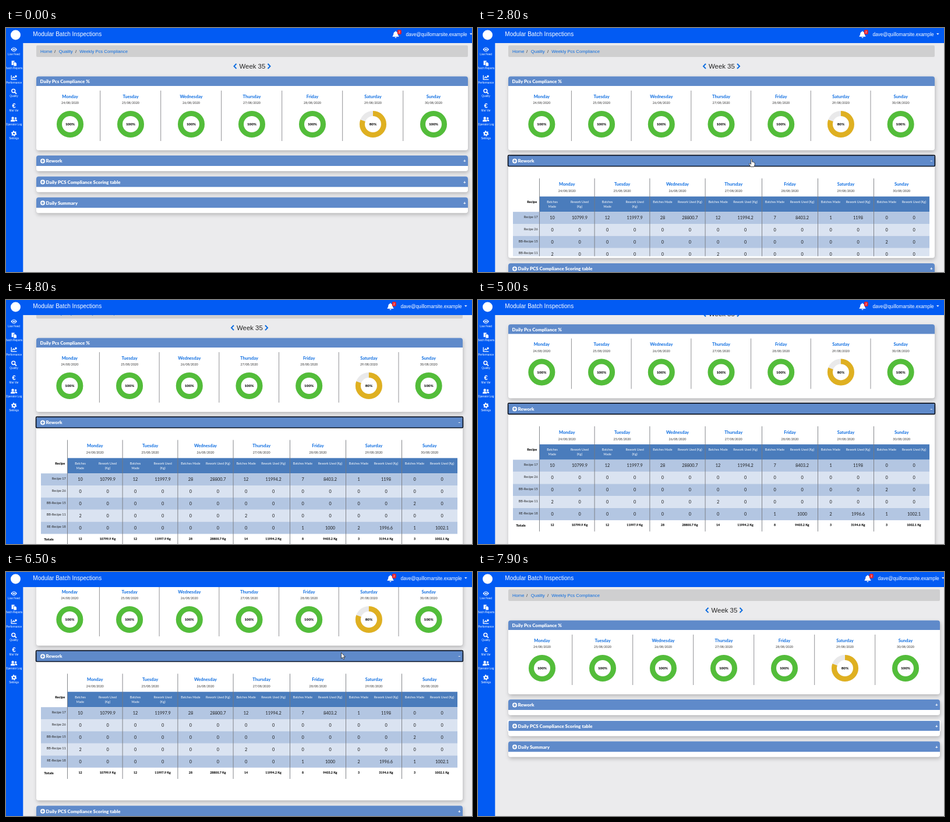
These frames come from a looping animation (800 px wide and 421 px high, 8 s). An HTML page:

```html
<!DOCTYPE html>
<html lang="en">
<head>
<meta charset="utf-8">
<title>Weekly compliance</title>
<style>
  html, body { margin: 0; width: 100%; height: 100%; overflow: hidden; background: #ebebed; }
  svg { display: block; width: 100vw; height: 100vh; }
  .arial { font-family: "Liberation Sans", Arial, sans-serif; }
  .lato { font-family: Lato, sans-serif; }
  .shade { filter: drop-shadow(1px 3px 3px rgba(0, 0, 0, .22)); }
</style>
</head>
<body>
<svg viewBox="0 0 800 421" preserveAspectRatio="none">
  <rect width="800" height="421" fill="#ebebed"/>
  <g id="page"></g>
  <rect width="800" height="26" fill="#025bf3"/>
  <rect width="29.3" height="421" fill="#025bf3"/>
  <circle cx="16.5" cy="12" r="8.5" fill="#fff"/>
  <text class="arial" x="46.3" y="14.3" font-size="10" fill="#fff">Modular Batch Inspections</text>
  <g id="account">
    <path d="M663.6 14.2Q665.3 12.8 665.3 10Q665.5 6.8 668.4 6.3V5.3H669.6V6.3Q672.5 6.8 672.7 10Q672.7 12.8 674.4 14.2V15H663.6ZM667.4 15.7H670.6Q670.4 17.2 669 17.2Q667.6 17.2 667.4 15.7Z" fill="#fff"/>
    <rect x="671.8" y="3" width="7" height="8" rx="2" fill="#e3202d"/>
    <text class="arial" x="675.3" y="9" font-size="5.5" fill="#fff" text-anchor="middle">2</text>
    <text class="arial" x="686.5" y="13.6" font-size="8.18" fill="#fff">dave@quillomarsite.example</text>
    <path d="M796 9.3H800.6L798.3 11.8Z" fill="#fff"/>
  </g>
  <g id="side"></g>
  <g id="cursor" stroke="#222" stroke-width=".8" stroke-linejoin="round" fill="#fff">
    <path id="arrow" d="M0 0V10.2L2.3 8.2L3.8 11.8L5.4 11.1L3.9 7.6H7Z"/>
    <path id="hand" d="M-1 1Q0-.8 1 1V5L2.7 5.2L4.2 5.8L5.6 6.8V10L4.4 13.4H-1.4L-3.8 9.4Q-4.6 7.4-3 7.6L-1 9.2Z"/>
  </g>
</svg>
<script>
const LOOP = 8000, STEP = 100, GROW = 231, LEFT = 52;
const BLUE = '#5f8aca', LINK = '#0a6be0', WHITE = '#fff';
const days = ['Monday', 'Tuesday', 'Wednesday', 'Thursday', 'Friday', 'Saturday', 'Sunday'];
const dayX = [0, 94.6, 189.4, 284.6, 382, 478, 574, 669.5];
// Non-zero cells only: column index -> value (two columns per day).
const recipes = [
  ['Recipe 17', {0: 10, 1: 10799.9, 2: 12, 3: 11997.9, 4: 28, 5: 28800.7, 6: 12, 7: 11994.2, 8: 7, 9: 8403.2, 10: 1, 11: 1198}],
  ['Recipe 26', {}],
  ['BB-Recipe 15', {12: 2}],
  ['BB-Recipe 11', {0: 2, 6: 2}],
  ['RE-Recipe 18', {8: 1, 9: 1000, 10: 2, 11: 1996.6, 12: 1, 13: 1002.1}]
];
const totals = [12, '10799.9 Kg', 12, '11997.9 Kg', 28, '28800.7 Kg', 14, '11994.2 Kg', 8, '9403.2 Kg', 3, '3194.6 Kg', 3, '1002.1 Kg'];

// time, x, y of the pointer tip
const pointer = [
  [900, 802, 150], [1700, 470, 226], [3000, 469.5, 226], [3300, 504.5, 234],
  [3500, 504.5, 234], [3700, 600, 245], [4000, 600, 245], [4200, 720, 256],
  [4500, 805, 262], [5600, 805, 190], [6200, 580, 148], [6400, 580, 148],
  [6500, 575.5, 139], [7200, 575.5, 139], [7500, 573, 261]
];
const scrolling = [[4700, 0], [4800, 18], [5300, 77], [5600, 84]];

const el = id => document.getElementById(id);
const ease = u => { u = Math.min(1, Math.max(0, u)); return u * u * (3 - 2 * u); };

function track(keys, t, k = 1) {
  if (t <= keys[0][0]) return keys[0][k];
  for (let i = 1; i < keys.length; i++) {
    const a = keys[i - 1], b = keys[i];
    if (t <= b[0]) return a[k] + (b[k] - a[k]) * (t - a[0]) / (b[0] - a[0]);
  }
  return keys[keys.length - 1][k];
}

const rect = (x, y, w, h, fill, more = '') =>
  `<rect x="${x}" y="${y}" width="${w}" height="${h}" fill="${fill}" ${more}/>`;
const line = (x, y1, y2, color) =>
  `<path d="M${x} ${y1}V${y2}" stroke="${color}" stroke-width=".9"/>`;
const text = (s, x, y, size, fill, weight = 400, anchor = 'middle', font = 'lato') =>
  `<text class="${font}" x="${x}" y="${y}" font-size="${size}" fill="${fill}" font-weight="${weight}" text-anchor="${anchor}">${s}</text>`;
const date = i => `${24 + i}/08/2020`;

function card(y, head, body, right) {
  const w = right - LEFT, r = 4;
  return rect(LEFT, y, w, head + body, WHITE, `rx="${r}" class="shade"`) +
    `<path d="M${LEFT} ${y + head}v${r - head}q0-${r} ${r}-${r}h${w - 2 * r}q${r} 0 ${r} ${r}v${head - r}z" fill="${BLUE}"/>`;
}

function fold(title, y, body, right, sign) {
  return card(y, 18, body, right) +
    `<circle cx="63" cy="${y + 9.5}" r="4" fill="#fff"/>` +
    `<path d="M60.6 ${y + 9.5}h4.8m-2.4-2.4v4.8" stroke="${BLUE}" stroke-width="1.3"/>` +
    text(title, 68.6, y + 12.4, 8, WHITE, 900, 'start') +
    text(sign, right - 5.8, y + 12.3, 8, WHITE, 900);
}

function ring(y, right, color) {
  return rect(LEFT - .4, y - .3, right - LEFT + .8, 18.8, 'none', `rx="1.5" stroke="${color}" stroke-width="1.7"`);
}

function donut(x, y, share) {
  const r = 18.5, len = 2 * Math.PI * r, color = share < 1 ? '#dfb021' : '#53bd3a';
  const circle = (c, dash) => `<circle cx="${x}" cy="${y}" r="${r}" fill="none" stroke="${c}" stroke-width="9" ${dash}/>`;
  return circle('#e9e9ea', '') +
    circle(color, `stroke-dasharray="${len * share} ${len}" transform="rotate(-90 ${x} ${y})"`) +
    text(share * 100 + '%', x, y + 2.3, 6.3, '#111', 900);
}

function summary(right) {
  const pitch = (right - LEFT - 13) / 7;
  let s = rect(LEFT, 30, right - LEFT, 20, '#cfcfd0', 'rx="2"');
  [['Home', 59], ['Quality', 90.7], ['Weekly Pcs Compliance', 126.2]].forEach(([name, x]) => {
    s += text(name, x, 43, 7.7, LINK, 400, 'start', 'arial');
  });
  s += text('/', 84, 43, 7.7, '#333', 400, 'middle', 'arial') + text('/', 120, 43, 7.7, '#333', 400, 'middle', 'arial');
  const mid = (LEFT + right) / 2;
  s += text('Week 35', mid + .4, 70, 11.4, '#222', 400, 'middle', 'arial');
  s += `<path d="M${mid - 27} 61.7l-4 4.2l4 4.2M${mid + 27} 61.7l4 4.2l-4 4.2" fill="none" stroke="${LINK}" stroke-width="2"/>`;
  s += card(83.5, 16.5, 111, right) + text('Daily Pcs Compliance %', 58.6, 95.2, 8, WHITE, 900, 'start');
  days.forEach((day, i) => {
    const x = 58 + pitch * (i + .5);
    if (i) s += line(57.7 + pitch * i, 108, 195, '#85858a');
    s += text(day, x, 120.6, 7.5, LINK, 700) + text(date(i), x, 131.3, 5.4, '#333') +
      donut(x, 166, day === 'Saturday' ? .8 : 1);
  });
  return s;
}

function table(right) {
  const end = right - 9, k = (end - 105.5) / dayX[7], rowH = 20.85;
  const at = i => 105.5 + dayX[i] * k;
  const cell = c => at(c >> 1) + (c % 2 ? 69 : 22) * k;
  let s = rect(105.5, 290.7, end - 105.5, 26.5, '#4a7cbc') + text('Recipe', 101.2, 302, 5.6, '#111', 900, 'end');
  recipes.forEach(([name, values], r) => {
    const y = 317.2 + r * rowH;
    s += rect(60, y, end - 60, rowH + .1, r % 2 ? '#dae3f1' : '#b3c6e2') + text(name, 102.7, y + 10.6, 5.5, '#222', 400, 'end');
    for (let c = 0; c < 14; c++) s += text(values[c] || 0, cell(c), y + 12.9, 7.3, '#1c1c1c');
  });
  s += text('Totals', 65.3, 433, 6.2, '#111', 900, 'start');
  totals.forEach((v, c) => { s += text(v, cell(c), 432, 5.3, '#111', 900); });
  days.forEach((day, i) => {
    const mid = (at(i) + at(i + 1)) / 2, a = cell(2 * i), b = cell(2 * i + 1);
    s += line(at(i), 259.5, 441, '#77797e') + text(day, mid, 272.4, 7.5, LINK, 700) + text(date(i), mid, 283.3, 5.4, '#333');
    const heads = i < 2
      ? [['Batches', a, 301.7], ['Made', a, 309.7], ['Rework Used', b, 301.7], ['(Kg)', b, 309.7]]
      : [['Batches Made', a, 301.7], ['Rework Used (Kg)', b, 301.7]];
    heads.forEach(([label, x, y]) => { s += text(label, x, y, 5.35, WHITE); });
  });
  return s;
}

function page(open, right, t) {
  const grow = GROW * open;
  let s = summary(right) + fold('Rework', 220, 9 + grow, right, t >= 2500 && t < 6700 ? '–' : '+');
  if (open > 0) {
    s += `<clipPath id="body"><rect x="${LEFT}" y="238" width="${right - LEFT}" height="${6 + grow}"/></clipPath>` +
      `<g clip-path="url(#body)">${table(right)}</g>`;
  }
  s += fold('Daily PCS Compliance Scoring table', 256.3 + grow, 9, right, '+');
  s += fold('Daily Summary', 292.3 + grow, 9, right, '+');
  if (t >= 2500 && t < 7600) s += ring(220, right, '#0b1220');
  if (t >= 7600) s += ring(256.3, right, WHITE);
  return s;
}

function sidebar() {
  const icons = [
    ['Live Feed', 37, '<path d="M-5.2 0Q0-7.4 5.2 0Q0 7.4-5.2 0Z"/><circle r="2.7" fill="#025bf3"/><circle r="1.5"/>'],
    ['Batch Reports', 61, '<path d="M-4-4.5H1V-2.5H-1V3H-4Z"/><path d="M-.3-1.8H2.6L4.4 0V4.6H-.3Z"/>'],
    ['Performance', 85.5, '<path d="M-4.4-4V3.4H4.8M-2.6 1L-.6-1.4L1 .4L4-2.8M1.8-3H4.2V-.6" fill="none" stroke="#fff" stroke-width="1.3"/>'],
    ['Quality', 109.3, '<path d="M1.6 1.6L4.4 4.4" stroke="#fff" stroke-width="1.9"/><circle cx="-.8" cy="-.8" r="2.9" fill="none" stroke="#fff" stroke-width="1.5"/>'],
    ['Mat Var', 133.7, text('€', 0, 3.9, 11, WHITE, 700, 'middle', 'arial')],
    ['Operator Log', 157.5, '<circle cx="-2" cy="-2" r="2.2"/><path d="M-5.6 4V2.6Q-5.4 .6-3.4 .6H-.6Q1.4 .6 1.6 2.6V4Z"/><circle cx="3" cy="-1.7" r="1.7"/><path d="M2 .6H4Q5.6 .8 5.8 3.3H2.4Q2.3 1.5 1.4 .8Z"/>'],
    ['Settings', 182, '<circle r="2.6" fill="none" stroke="#fff" stroke-width="2"/><circle r="4" fill="none" stroke="#fff" stroke-width="1.5" stroke-dasharray="2.1 2.09"/>']
  ];
  el('side').innerHTML = icons.map(([label, y, shape]) =>
    `<g transform="translate(13.6 ${y})" fill="#fff">${shape}</g>` +
    text(label, 13.6, y + 10, 4.7, WHITE, 400, 'middle', 'arial')).join('');
}

function draw(t) {
  const open = ease((t - 2500) / 500) - ease((t - 6700) / 500);
  const spare = GROW * open - 86;
  const right = spare > 0 ? 784 : 793;
  const scroll = Math.max(0, Math.min(track(scrolling, t), spare));
  el('page').innerHTML = page(open, right, t);
  el('page').setAttribute('transform', `translate(0 ${-scroll})`);
  el('account').setAttribute('transform', `translate(${right - 793} 0)`);
  const shown = t >= 900 && t < 7600;
  const hand = t >= 1600 && t <= 3500 || t >= 6600;
  el('cursor').setAttribute('transform', `translate(${track(pointer, t, 1)} ${track(pointer, t, 2)})`);
  el('arrow').style.display = shown && !hand ? '' : 'none';
  el('hand').style.display = shown && hand ? '' : 'none';
}

let last = -1;
function tick() {
  const t = Math.floor(performance.now() % LOOP / STEP) * STEP;
  if (t !== last) draw(last = t);
  requestAnimationFrame(tick);
}
sidebar();
tick();
</script>
</body>
</html>
```
